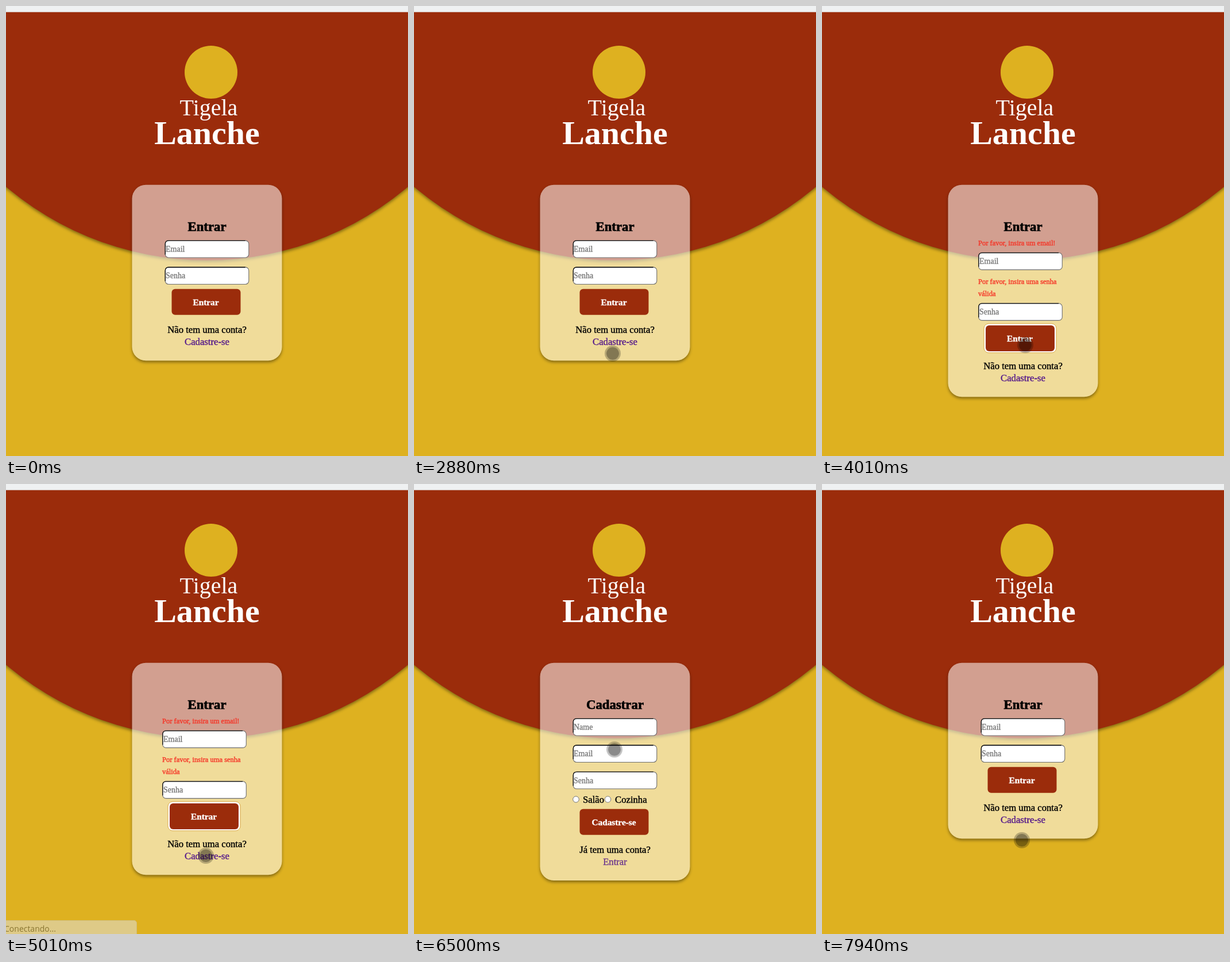
These frames come from a looping animation (700 by 782 pixels, 8 s). An HTML page:

```html
<!DOCTYPE html>
<html lang="pt">
<head>
<meta charset="utf-8">
<title>Entrar</title>
<style>
html, body { margin: 0; width: 100%; height: 100%; overflow: hidden; }
body { background: #deb120; }
.stage { position: absolute; left: 0; top: 0; width: 700px; height: 782px; overflow: hidden; background: #deb120; }
.bar { position: absolute; left: 0; top: 0; width: 700px; height: 10px; background: #eff1f2; border-bottom: 1px solid #c9a79d; }
svg { position: absolute; left: 0; top: 0; width: 700px; height: 782px; }
.dome { fill: #9b2c0b; filter: drop-shadow(0 3px 2.5px rgba(0, 0, 0, .4)); }
.scene { position: absolute; left: 0; top: 0; width: 700px; height: 782px; opacity: 0; }
.card {
  fill: #fff; fill-opacity: .55;
}
.shade { fill: #000; fill-opacity: .4; filter: blur(2.5px); }

text { font-family: "Liberation Serif", "Times New Roman", serif; font-size: 16.7px; stroke-width: .4px; }
.mid { text-anchor: middle; }
.body { stroke: #000; }
.head { font-size: 22.8px; font-weight: bold; stroke: #000; stroke-width: .7px; text-anchor: middle; }
.hint { font-size: 14px; fill: #757575; stroke: #757575; stroke-width: .3px; }
.error { font-size: 12.5px; fill: #f53527; stroke: #f53527; }
.label { font-size: 15.3px; font-weight: bold; fill: #fff; stroke: #fff; text-anchor: middle; }
.link { fill: #551a8b; stroke: #551a8b; text-anchor: middle; }
.button { fill: #9b2c0b; }
.radio { fill: #fff; stroke: #767676; }
.brand { fill: #fff; text-anchor: middle; }
.small { font-size: 40px; }
.large { font-size: 58px; font-weight: bold; }

.tip, .status {
  position: absolute; box-sizing: border-box; opacity: 0; white-space: nowrap;
  font-family: "Open Sans", "Noto Sans", sans-serif; color: #3c4043;
}
.tip { border: 1px solid #8a8a8a; background: #fff; color: #444; font-size: 13.5px; line-height: 34px; height: 40px; padding-left: 6px; }
.status {
  left: -6px; top: 758px; width: 234px; height: 26px; padding-left: 2px;
  border: 1px solid #c5c9cd; border-radius: 0 5px 0 0; background: #dfe3e7; font-size: 14px; line-height: 27px;
}
.dot {
  position: absolute; left: -14px; top: -14px; width: 22px; height: 22px; opacity: 0;
  border: 3px solid rgba(0, 0, 0, .24); border-radius: 50%;
  background: rgba(0, 0, 0, .46); background-clip: padding-box;
}

.login { animation: login 8s step-end infinite; }
.invalid { animation: invalid 8s step-end infinite; }
.signup { animation: signup 8s step-end infinite; }
.early { left: 642px; top: 769px; width: 49px; animation: early 8s linear infinite; }
.pause { left: 632px; top: 757px; width: 57px; animation: pause 8s linear infinite; }
.status { animation: status 8s linear infinite; }
.dot { animation: move 8s linear infinite, show 8s step-end infinite; }

@keyframes login { 0% { opacity: 1 } 45% { opacity: 0 } 93.375% { opacity: 1 } }
@keyframes invalid { 0% { opacity: 0 } 45% { opacity: 1 } 66.875% { opacity: 0 } }
@keyframes signup { 0% { opacity: 0 } 66.875% { opacity: 1 } 93.375% { opacity: 0 } }
@keyframes show { 0% { opacity: 0 } 29% { opacity: 1 } }
@keyframes early {
  0%, 6.4% { opacity: 0 }
  8.25%, 14.8% { opacity: 1 }
  16.5%, 100% { opacity: 0 }
}
@keyframes pause {
  0%, 14.8% { opacity: 0 }
  16.5%, 23.4% { opacity: 1 }
  25.6%, 100% { opacity: 0 }
}
@keyframes status {
  0%, 61.7% { opacity: 0 }
  63.5%, 69.5% { opacity: 1 }
  72.75%, 89.75% { opacity: 0 }
  91.75%, 96% { opacity: 1 }
  98.75%, 100% { opacity: 0 }
}
@keyframes move {
  0%, 29% { transform: translate(366px, 726px) }
  30.5% { transform: translate(352px, 716px) }
  33% { transform: translate(322px, 662px) }
  34.9% { transform: translate(321px, 618px) }
  36% { transform: translate(346px, 604px) }
  38.5%, 39.4% { transform: translate(346px, 574px) }
  43.75% { transform: translate(350px, 518px) }
  46.25% { transform: translate(350px, 521px) }
  49.25% { transform: translate(352px, 570px) }
  50.125% { transform: translate(354px, 589px) }
  53.75% { transform: translate(344px, 654px) }
  56% { transform: translate(340px, 661px) }
  59.25%, 71.25% { transform: translate(348px, 646px) }
  77.1%, 79.6% { transform: translate(348px, 419px) }
  89.1% { transform: translate(354px, 661px) }
  92.5%, 96.6% { transform: translate(356px, 669px) }
  99.25%, 100% { transform: translate(348px, 619px) }
}
</style>
</head>
<body>
<div class="stage">
  <svg viewBox="0 0 700 782">
    <defs>
      <g id="field">
        <rect x=".5" y=".6" width="145.6" height="29.6" rx="6" fill="#fff" stroke="#6d6d6d" stroke-width="1.1"/>
        <path d="M.6 25V6.6Q.6 .7 6.6 .7H140" fill="none" stroke="#111" stroke-width="1.3"/>
      </g>
      <!-- keeps each card's shadow outside its translucent face -->
      <clipPath id="around305"><path clip-rule="evenodd" d="M0 0H700V782H0ZM243.5 310.7h213a24 24 0 0 1 24 24v257.6a24 24 0 0 1 -24 24h-213a24 24 0 0 1 -24 -24v-257.6a24 24 0 0 1 24 -24Z"/></clipPath>
      <clipPath id="around368"><path clip-rule="evenodd" d="M0 0H700V782H0ZM243.5 310.7h213a24 24 0 0 1 24 24v320.6a24 24 0 0 1 -24 24h-213a24 24 0 0 1 -24 -24v-320.6a24 24 0 0 1 24 -24Z"/></clipPath>
      <clipPath id="around378"><path clip-rule="evenodd" d="M0 0H700V782H0ZM243.5 310.7h213a24 24 0 0 1 24 24v330.4a24 24 0 0 1 -24 24h-213a24 24 0 0 1 -24 -24v-330.4a24 24 0 0 1 24 -24Z"/></clipPath>
    </defs>
    <circle class="dome" cx="350" cy="-101" r="543"/>
    <circle cx="357" cy="115" r="46" fill="#deb120"/>
    <text class="brand small" x="353" y="190">Tigela</text>
    <text class="brand large" x="350" y="240">Lanche</text>
  </svg>
  <div class="bar"></div>

  <div class="scene login">
    <svg viewBox="0 0 700 782">
      <g clip-path="url(#around305)"><rect class="shade" x="219.5" y="313.7" width="261" height="305.6" rx="24"/></g>
      <rect class="card" x="219.5" y="310.7" width="261" height="305.6" rx="24"/>
      <text class="head" x="350" y="391">Entrar</text>
      <use href="#field" x="276.7" y="407"/>
      <text class="hint" x="278" y="427">Email</text>
      <use href="#field" x="276.7" y="453.3"/>
      <text class="hint" x="278" y="473">Senha</text>
      <rect class="button" x="288.5" y="491.7" width="120" height="45" rx="6"/>
      <text class="label" x="348" y="520">Entrar</text>
      <text class="body mid" x="350" y="568">Não tem uma conta?</text>
      <text class="link" x="350" y="589">Cadastre-se</text>
    </svg>
  </div>

  <div class="scene invalid">
    <svg viewBox="0 0 700 782">
      <g clip-path="url(#around368)"><rect class="shade" x="219.5" y="313.7" width="261" height="368.6" rx="24"/></g>
      <rect class="card" x="219.5" y="310.7" width="261" height="368.6" rx="24"/>
      <text class="head" x="350" y="391">Entrar</text>
      <text class="error" x="272" y="416">Por favor, insira um email!</text>
      <use href="#field" x="272.2" y="428.2"/>
      <text class="hint" x="274" y="448">Email</text>
      <text class="error" x="272" y="483">Por favor, insira uma senha</text>
      <text class="error" x="272" y="504">válida</text>
      <use href="#field" x="272.2" y="516.2"/>
      <text class="hint" x="274" y="536">Senha</text>
      <rect x="282" y="552" width="126" height="50.5" rx="8" fill="#fff" stroke="#d9a94a"/>
      <rect class="button" x="285" y="555" width="120" height="45" rx="6"/>
      <text class="label" x="344.5" y="583">Entrar</text>
      <text class="body mid" x="350" y="631">Não tem uma conta?</text>
      <text class="link" x="350" y="652">Cadastre-se</text>
    </svg>
  </div>

  <div class="scene signup">
    <svg viewBox="0 0 700 782">
      <g clip-path="url(#around378)"><rect class="shade" x="219.5" y="313.7" width="261" height="378.4" rx="24"/></g>
      <rect class="card" x="219.5" y="310.7" width="261" height="378.4" rx="24"/>
      <text class="head" x="350" y="391">Cadastrar</text>
      <use href="#field" x="276.7" y="407"/>
      <text class="hint" x="278" y="427">Name</text>
      <use href="#field" x="276.7" y="453.3"/>
      <text class="hint" x="278" y="473">Email</text>
      <use href="#field" x="276.7" y="499.6"/>
      <text class="hint" x="278" y="520">Senha</text>
      <circle class="radio" cx="282" cy="548" r="5.3"/>
      <text class="body" x="294" y="554">Salão</text>
      <circle class="radio" cx="337.5" cy="548" r="5.3"/>
      <text class="body" x="350" y="554">Cozinha</text>
      <rect class="button" x="288.5" y="564.7" width="120" height="45" rx="6"/>
      <text class="label" x="348" y="593">Cadastre-se</text>
      <text class="body mid" x="350" y="641">Já tem uma conta?</text>
      <text class="link" x="350" y="662" opacity=".85">Entrar</text>
    </svg>
  </div>

  <div class="tip early"></div>
  <div class="tip pause">Pausar</div>
  <div class="status">Conectando...</div>
  <div class="dot"></div>
</div>
</body>
</html>
```
